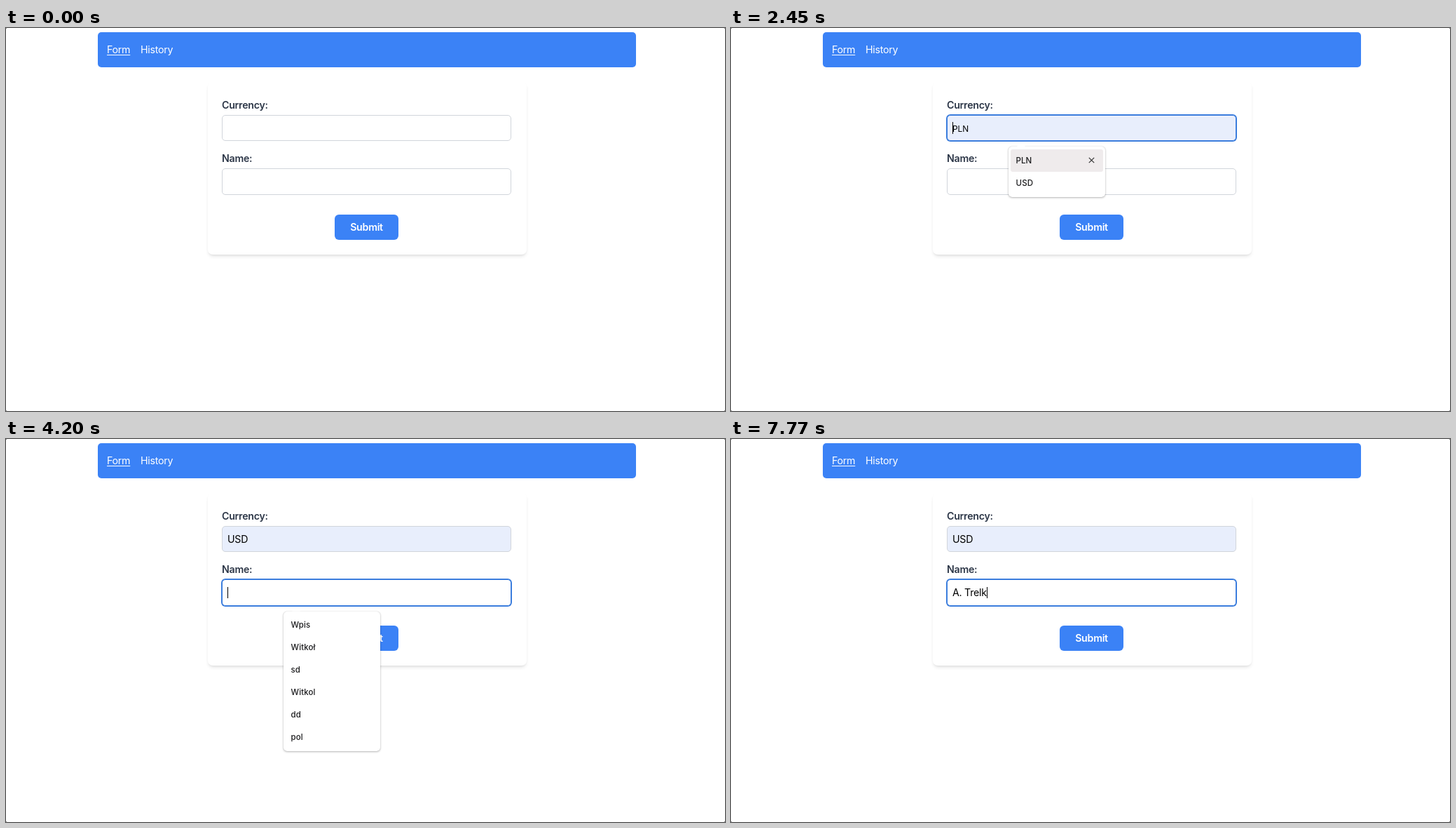
Animation, 1026 px wide and 546 px high, one loop 8 s. Source, as an HTML page:

```html
<!DOCTYPE html>
<html lang="en">
<head>
<meta charset="utf-8">
<title>Currency form</title>
<style>
  html, body { margin: 0; width: 100%; height: 100%; overflow: hidden; background: #fff; }
  #stage { position: relative; width: 1026px; height: 546px; overflow: hidden; background: #fff;
    font: 14.22px/20px Inter, "Noto Sans", sans-serif; letter-spacing: -.02em; }
  #stage * { position: absolute; box-sizing: border-box; white-space: pre; }
  .corner { width: 1px; height: 1px; background: #777; }
  nav { left: 131px; top: 6px; width: 768px; height: 50px; border-radius: 5px; background: #3b82f6; color: #fff; }
  nav span { top: 15.3px; }
  .on { text-decoration: underline; text-decoration-thickness: 1px; text-underline-offset: 2px; }
  .card { left: 287.5px; top: 77px; width: 455px; height: 246px; border-radius: 7px;
    box-shadow: 0 3.6px 5.3px -1px rgba(0,0,0,.1), 0 1.8px 3.6px -2px rgba(0,0,0,.1); }
  label { left: 308px; font-weight: 600; color: #2d3748; }
  .field { left: 308px; width: 413px; height: 37.5px; border: 1px solid #d1d5db; border-radius: 5px;
    background: #fff; color: #000; }
  .field.focus { border-color: #3b7ddd; box-shadow: 0 0 0 1px #3b7ddd; }
  .field.filled { background: #e8eefc; }
  .field span { left: 7px; top: 8.2px; }
  .field .small { font-size: 11.85px; letter-spacing: 0; top: 9px; }
  .caret { top: 9.5px; width: 1px; height: 16.5px; background: #000; }
  button { left: 469px; top: 266px; width: 91px; height: 35.5px; padding: 0; border: 0; border-radius: 6px;
    background: #3b82f6; color: #fff; font: inherit; font-weight: 600; letter-spacing: inherit; text-align: center; }
  .popup { left: 396px; width: 138px; border-radius: 5px; background: #fff;
    box-shadow: 0 0 1px rgba(0,0,0,.22), 0 1px 3px rgba(0,0,0,.28); }
  .arrow { left: 12px; top: -7px; width: 12px; height: 7px; background: #fff;
    clip-path: polygon(50% 0, 100% 100%, 0 100%); }
  .row { left: 3px; width: 132px; height: 32px; border-radius: 3px; font-size: 11.5px; font-weight: 500;
    line-height: 32px; letter-spacing: .01em; padding-left: 7.5px; color: #1c1c1e; }
  .row.hover { background: #efebec; }
  .row svg { left: 111px; top: 11.5px; }
</style>
</head>
<body>
<div id="stage">
  <i class="corner" style="left:0;top:0"></i><i class="corner" style="right:0;top:0"></i>
  <i class="corner" style="left:0;bottom:0"></i><i class="corner" style="right:0;bottom:0"></i>
  <nav><span class="on" style="left:13px">Form</span><span style="left:61px">History</span></nav>
  <div class="card"></div>
  <label style="top:99.5px">Currency:</label>
  <div class="field" id="currency" style="top:123.5px"></div>
  <label style="top:176px">Name:</label>
  <div class="field" id="name" style="top:200px"></div>
  <button>Submit</button>
  <div class="popup" id="popup"></div>
</div>
<script>
const LOOP = 8000;
const FULL = "A. Trelk";
const CODES = ["PLN", "USD"];
const RECENT = ["Wpis", "Witkoł", "sd", "Witkol", "dd", "pol"];
const A_ROWS = [FULL, "aa", "Another entry", "asd", "abc", "all"];
const TYPED = [[4340, 1], [5250, 2], [5810, 3], [6580, 4], [7070, 5], [7350, 6], [7630, 7], [7770, 8]];
const BLINKS = [[1610, 2100], [2590, 2870], [3710, 4200], [4830, 5250], [5740, 5810], [6300, 6580]];
const $ = id => document.getElementById(id);
const CROSS = '<svg width="9" height="9"><path d="M.8 .8 8.2 8.2M8.2 .8 .8 8.2" stroke="#333" stroke-width="1.2"/></svg>';

function stateAt(t) {
  const focus = t < 1050 ? "" : t < 3150 ? "currency" : "name";
  const hover = t < 2450 || t >= 2870 ? -1 : t < 2660 ? 0 : 1;
  const typed = TYPED.reduce((n, [at, len]) => t >= at ? len : n, 0);
  let rows = [];
  if (t >= 1120 && t < 2870) rows = CODES;
  else if (t >= 3150 && t < 4340) rows = RECENT;
  else if (t >= 4340 && t < 5250) rows = A_ROWS;
  else if (t >= 5250 && t < 7770) rows = [FULL];
  return {
    focus, hover, rows,
    code: hover >= 0 ? CODES[hover] : t >= 2870 ? "USD" : "",
    name: FULL.slice(0, typed),
    caret: !BLINKS.some(([off, on]) => t >= off && t < on)
  };
}

function drawField(id, text, s, filled, preview) {
  const el = $(id), focused = s.focus === id;
  el.className = "field" + (focused ? " focus" : "") + (filled ? " filled" : "");
  el.innerHTML = `<span class="${preview ? "small" : ""}">${text}</span>`;
  if (!focused || !s.caret) return;
  const width = preview ? 0 : el.firstChild.getBoundingClientRect().width;
  el.insertAdjacentHTML("beforeend", `<i class="caret" style="left:${7 + Math.round(width)}px"></i>`);
}

function drawPopup(s) {
  const el = $("popup");
  el.style.display = s.rows.length ? "block" : "none";
  el.style.top = (s.focus === "name" ? 245.5 : 169) + "px";
  el.style.height = s.rows.length * 32 + 7.5 + "px";
  el.innerHTML = '<i class="arrow"></i>' + s.rows.map((text, i) =>
    `<div class="row${i === s.hover ? " hover" : ""}" style="top:${3.5 + i * 32}px">${text}${i === s.hover ? CROSS : ""}</div>`
  ).join("");
}

let last = "";
const start = performance.now();
function tick(now) {
  const s = stateAt(Math.max(0, now - start) % LOOP);
  const key = JSON.stringify(s);
  if (key !== last) {
    last = key;
    drawField("currency", s.code, s, s.code !== "", s.hover >= 0);
    drawField("name", s.name, s, false, false);
    drawPopup(s);
  }
  requestAnimationFrame(tick);
}
tick(start);
</script>
</body>
</html>
```
